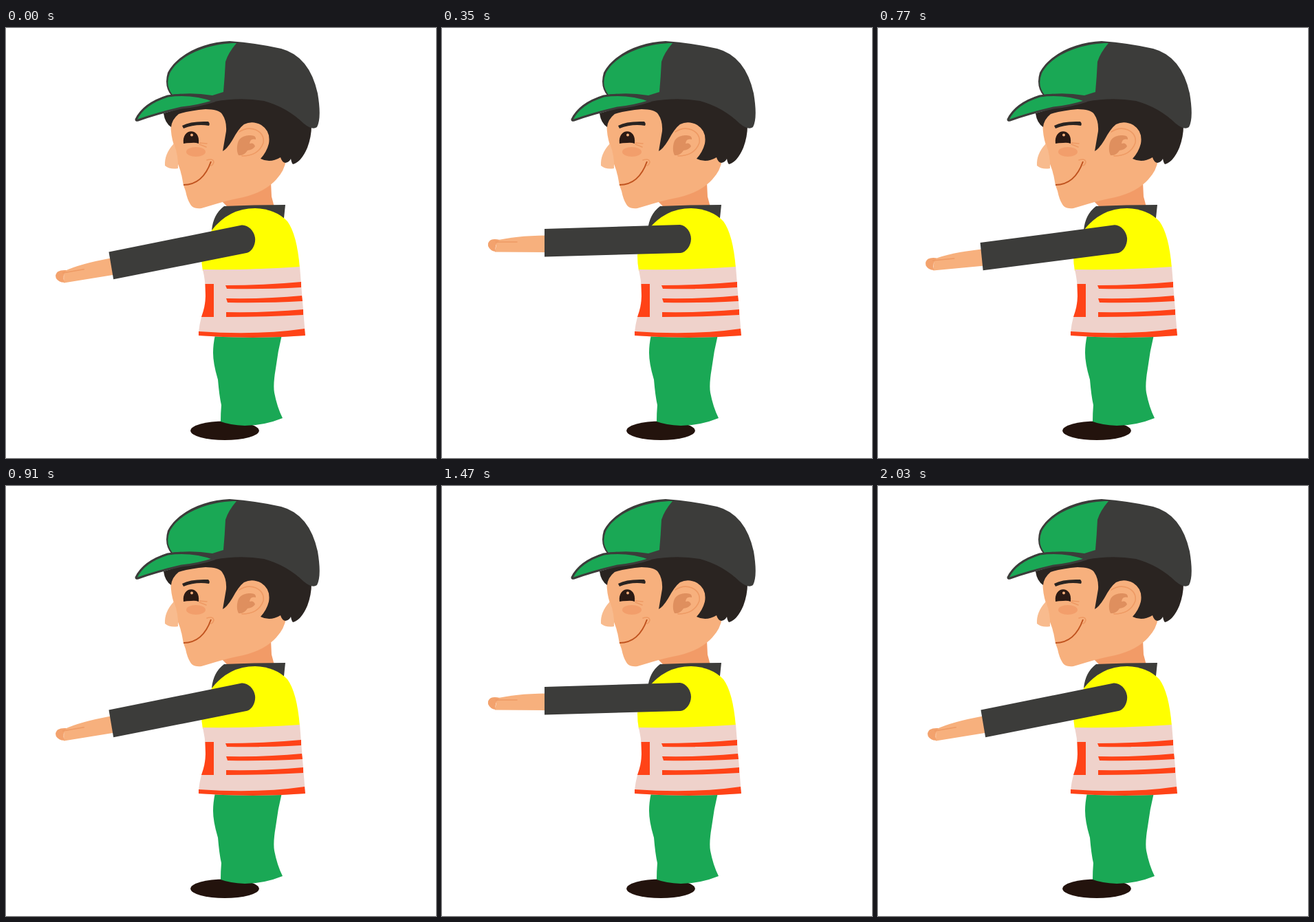
Recreate the animation shown at these times as an HTML page. Size 625 by 625 pixels, loop 2100 ms.

```html
<!DOCTYPE html>
<html lang="en">
<head>
<meta charset="utf-8">
<title>Worker waving</title>
<style>
  html, body { margin: 0; width: 100%; height: 100%; overflow: hidden; background: #fff; }
  svg { display: block; width: 100%; height: 100%; }
  .dark { fill: #3c3c3a; }
  .green { fill: #1aa855; }
  .skin { fill: #f7b07d; }
  .hair { fill: #2a2421; }
  .red { fill: #ff4317; }
  .line { fill: none; stroke: #ee9a64; stroke-width: 1.6; stroke-linecap: round; }
</style>
</head>
<body>
<svg viewBox="0 0 625 625">
  <!-- legs -->
  <ellipse cx="318" cy="585.3" rx="49.8" ry="13.8" fill="#23130d"/>
  <path class="green" d="M304 446H401Q395 470 392 495Q388 518 390 530Q394 551 402 567Q375 578 347 578Q325 577 312 572Q312 560 313 548Q310 535 308 511Q301 488 301 472Q301 460 304 446Z"/>

  <!-- neck and collar -->
  <path fill="#f29b67" d="M311 249L385 224L386 245L390 260H322Z"/>
  <path class="dark" d="M299 294Q301 271 317 259Q360 257 406 257L404 276L380 290H310Z"/>

  <!-- vest -->
  <path fill="#ff0" d="M299 294Q324 262 362 262Q392 263 409 281Q423 300 427 349L286 353Q284 342 284 330Q290 310 299 294Z"/>
  <path fill="#efd2cb" d="M286 351Q360 352 427 347L435 447Q360 453 280 447Q280 432 286 414Q290 402 290 386Q290 368 286 351Z"/>
  <g class="red">
    <path d="M289.500 372H302V420H284Q290 404 290 390Z"/>
    <path d="M319 374Q375 374 429 369L429 377Q380 380 321 379Z"/>
    <path d="M320 393Q380 394 430 389L431 397Q380 400 322 399Z"/>
    <path d="M320 413Q380 414 432 409L432 417Q380 420 320 420Z"/>
    <path d="M280 441Q365 447 434 437L435 447Q360 453 280 447Z"/>
  </g>

  <!-- head -->
  <path class="skin" d="M242 118Q236 145 244 170L249 195Q254 207 256 218Q257 228 261 237Q264 252 270 259Q275 263 284 262C303 257 317 251 345 246Q377 238 393 220Q405 207 407 192L400 120L320 108Z"/>
  <path fill="#f8bb8e" d="M244 168Q230 183 231 200Q238 206 250 204Q251 186 244 168Z"/>
  <path class="hair" d="M229 124Q231 138 240 144Q241 133 251 125Q267 120 290 118Q309 118 314 125Q321 135 320 150L315 179Q321 176 329 163Q338 146 346 140Q358 134 371 141Q385 150 382 168Q379 180 370 190Q384 197 399 188Q401 195 406 196Q412 195 414 190Q415 196 417 198Q429 195 438 174Q444 158 444 142L380 100H310Z"/>

  <!-- ear -->
  <path class="line" d="M339 151Q351 143 363 148Q376 154 374 167Q367 186 343 186"/>
  <path fill="#df8f5e" d="M336 172Q337 157 353 156Q364 155 363 162Q355 160 354 168Q360 166 362 172Q359 177 351 178Q346 186 338 185Q335 179 336 172Z"/>

  <!-- face -->
  <path class="hair" d="M256 142Q268 135 294 136Q297 139 295 142Q276 139 258 146Z"/>
  <path fill="#2b1a14" d="M258 168C255 145 283 144 280 168Q275 166 269 167Q262 167 258 168Z"/>
  <circle cx="270" cy="155.500" r="2" fill="#f7b07d"/>
  <ellipse cx="276" cy="180" rx="14" ry="7" fill="#f29e6b"/>
  <path class="line" d="M281 167L292 168M281 169L291 173"/>
  <path class="line" stroke-width="2" d="M292 192Q301 189 302 195Q301 199 298 200"/>
  <path fill="none" stroke="#c0531f" stroke-width="2" d="M258 228Q286 228 298 194"/>

  <!-- cap -->
  <path class="dark" d="M241 99Q229 85 235 65C249 37 290 20 325 19Q365 22 400 30Q441 41 453 95Q459 131 452 144Q445 149 433 139Q408 115 375 106Q340 100 303 107Z"/>
  <path class="green" d="M242 97Q231 83 238 66C251 40 293 22 335 22Q323 36 319 49Q318 70 316 93L300 98Q270 93 242 97Z"/>
  <path class="green" stroke="#3c3c3a" stroke-width="3" stroke-linejoin="round" d="M189 133Q200 110 235 99Q270 94 303 106Q278 114 255 116Q220 124 192 134Q189 135 189 133Z"/>

  <!-- arm, drawn in its raised pose -->
  <g id="arm">
    <path class="skin" d="M152 301.500Q104 302 80 309L77 325.500L152 326Z"/>
    <path fill="#f3a26d" d="M84 308Q76 306 71 308Q66 311 67 317Q70 324 78 325Q76 314 84 308Z"/>
    <path class="line" stroke-width="1" d="M78 311H109"/>
    <path class="dark" d="M149 292L346 286C355 287 362 297 362 306.500S355 326 347 327L149 332.500Z"/>
  </g>
</svg>
<script>
  const STEP = 70, LOOP = 30, SWING = 16, MOVE = 5, DROP = 9.6;
  const arm = document.getElementById('arm');

  // Share of the way up: rise, hold, sink, hold.
  function lift(step) {
    const p = step % SWING, half = SWING / 2;
    const part = Math.min(p % half, MOVE) / MOVE;
    return p < half ? part : 1 - part;
  }

  function draw(now) {
    const step = Math.floor(now / STEP) % LOOP;
    const angle = -DROP * (1 - lift(step));
    arm.setAttribute('transform', `rotate(${angle} 348 306)`);
    requestAnimationFrame(draw);
  }
  draw(performance.now());
</script>
</body>
</html>
```
